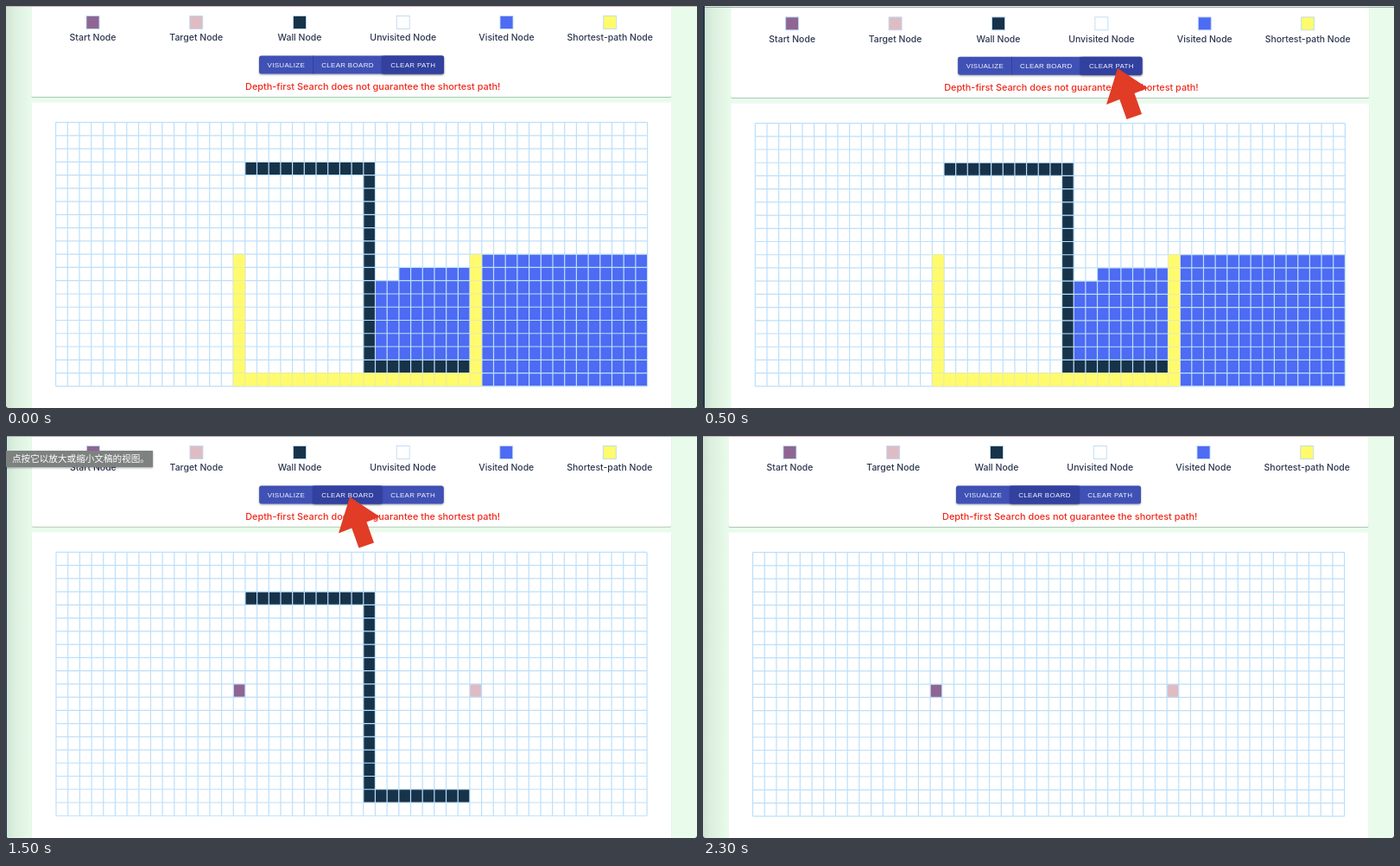
Write an HTML page that moves like this. It is 800 px wide and 465 px high and loops after 2.5 s.

```html
<!DOCTYPE html>
<html lang="en">
<head>
<meta charset="utf-8">
<title>Path finding board</title>
<style>
html, body { margin: 0; width: 100%; height: 100%; overflow: hidden; background: #e9fcec; }
svg { display: block; width: 800px; height: 465px; }
text { text-anchor: middle; }
.label { font: 500 10.5px Inter, sans-serif; fill: #2c3650; }
.note { font: 500 10.9px Inter, sans-serif; fill: #f0291c; }
.button { font: 8px "Liberation Sans", Arial, sans-serif; letter-spacing: .3px; fill: #f4f5fc; }
.tip { font: 500 10.6px "Noto Sans CJK SC", "Noto Sans CJK", sans-serif; fill: #fff; text-anchor: start; }
</style>
</head>
<body>
<svg id="stage" viewBox="0 0 800 465">
  <defs>
    <linearGradient id="shade">
      <stop offset="0" stop-color="#52695a" stop-opacity=".2"/>
      <stop offset=".4" stop-color="#52695a" stop-opacity=".08"/>
      <stop offset="1" stop-color="#52695a" stop-opacity="0"/>
    </linearGradient>
    <filter id="soft" x="-20%" y="-40%" width="140%" height="200%">
      <feDropShadow dx="0" dy="1" stdDeviation="1.1" flood-color="#000" flood-opacity=".35"/>
    </filter>
    <filter id="card" x="-5%" y="-5%" width="110%" height="112%">
      <feDropShadow dx="0" dy=".7" stdDeviation=".6" flood-color="#20402a" flood-opacity=".42"/>
    </filter>
  </defs>
  <rect width="800" height="465" fill="#e9fcec"/>
  <g id="page"></g>
  <g id="edges"></g>
  <path id="arrow" fill="#e03c26" d="M0 0L35 23L19.5 29L28 53L10.5 59L2.3 36L-13 42Z"/>
  <g id="tip">
    <rect x="-4" y="17" width="174" height="19" fill="#7d8281" filter="url(#soft)"/>
    <text class="tip" x="7" y="30">点按它以放大或缩小文稿的视图。</text>
  </g>
</svg>
<script>
const NS = 'http://www.w3.org/2000/svg';
const $ = id => document.getElementById(id);
const COLS = 50, ROWS = 20, LEFT = 57.6, TOP = 134.6, CW = 13.7, CH = 15.26;
const C = {
  start: '#8f6593', target: '#dfbcc4', wall: '#17334a',
  empty: '#ffffff', visited: '#4d6bf3', path: '#fffb6c'
};

function add(parent, tag, attrs, text) {
  const el = document.createElementNS(NS, tag);
  for (const k in attrs) el.setAttribute(k, attrs[k]);
  if (text) el.textContent = text;
  return parent.appendChild(el);
}

const rect = (parent, x, y, width, height, fill, more) =>
  add(parent, 'rect', { x, y, width, height, fill, ...more });

// Rectangular block of cells, inclusive of both corners
const block = (parent, c0, r0, c1, r1, fill) =>
  rect(parent, LEFT + c0 * CW, TOP + r0 * CH, (c1 - c0 + 1) * CW, (r1 - r0 + 1) * CH, fill);

const page = $('page');
rect(page, -4, 0, 34, 465, 'url(#shade)');
rect(page, 29.3, -10, 741.4, 115, '#fff', { rx: 2, filter: 'url(#card)' });
rect(page, 29.3, 111.5, 741.4, 400, '#fff', { rx: 2, filter: 'url(#card)' });

// Legend
[
  ['Start Node', C.start], ['Target Node', C.target], ['Wall Node', C.wall],
  ['Unvisited Node', C.empty], ['Visited Node', C.visited], ['Shortest-path Node', C.path]
].forEach(([name, fill], i) => {
  const x = 100.5 + i * 119.75;
  rect(page, x - 7.5, 11.5, 15, 15, fill, { stroke: '#bcdaf4', 'stroke-width': .9 });
  add(page, 'text', { class: 'label', x, y: 40.3 }, name);
});

// Buttons
rect(page, 293, 57.5, 214, 21, '#3f51b5', { rx: 2.5, filter: 'url(#soft)' });
const buttons = [
  ['VISUALIZE', 293, 355.5], ['CLEAR BOARD', 355.5, 435.3], ['CLEAR PATH', 435.3, 507]
].map(([name, x0, x1], i) => {
  const hover = rect(page, x0, 57.5, x1 - x0, 21, '#303f9f', { rx: 2, filter: 'url(#soft)' });
  if (i) rect(page, x0 - .4, 57.5, .8, 21, '#303f9f');
  add(page, 'text', { class: 'button', x: (x0 + x1) / 2 + .1, y: 71 }, name);
  return hover;
});
add(page, 'text', { class: 'note', x: 424.7, y: 97.4 },
  'Depth-first Search does not guarantee the shortest path!');

// Board
const walls = add(page, 'g');
block(walls, 16, 3, 26, 3, C.wall);
block(walls, 26, 4, 26, 18, C.wall);
block(walls, 27, 18, 34, 18, C.wall);

const visited = add(page, 'g');
block(visited, 27, 12, 34, 17, C.visited);
block(visited, 29, 11, 34, 11, C.visited);
block(visited, 36, 10, 49, 19, C.visited);

const ends = add(page, 'g');
block(ends, 15, 10, 15, 10, C.start);
block(ends, 35, 10, 35, 10, C.target);

let lines = '';
for (let c = 0; c <= COLS; c++) lines += `M${LEFT + c * CW} ${TOP}v${ROWS * CH}`;
for (let r = 0; r <= ROWS; r++) lines += `M${LEFT} ${TOP + r * CH}h${COLS * CW}`;
add(page, 'path', { d: lines, stroke: '#bddffa', 'stroke-width': 1.2, fill: 'none' });

const path = add(page, 'g', { stroke: '#e6ebb4', 'stroke-width': .8 });
for (let r = 10; r < 19; r++) {
  block(path, 15, r, 15, r, C.path);
  block(path, 35, r, 35, r, C.path);
}
for (let c = 15; c <= 35; c++) block(path, c, 19, c, 19, C.path);

// Window edges
const edges = $('edges');
const topEdge = rect(edges, 0, 0, 800, 1, '#cdb4b8');
const leftEdge = rect(edges, 0, 0, 1, 465, '#1d3b4c');
add(edges, 'path', { d: 'M0 462.5Q.5 464.5 2.5 465H0ZM800 462.5Q799.5 464.5 797.5 465H800Z', fill: '#24404c' });

// view: [x, y, scale] of the page; edge: [top y, top colour, left width]
const rest = [0, 0, 1], plain = [0, '#cdb4b8', 0];
const steps = [
  { view: rest, edge: plain, hover: 2, walls: 1, trail: 1 },
  { view: [3, 1.4, .997], edge: [.8, '#8b999b', 2], hover: 2, walls: 1, trail: 1, arrow: [480, 72] },
  { view: rest, edge: plain, hover: -1, walls: 1 },
  { view: [.5, 0, .9987], edge: [0, '#a9b4b3', 1], hover: 1, walls: 1, arrow: [398, 70.5], tip: 1 },
  { view: rest, edge: plain, hover: 1 }
];
const STEP = 500;
const show = (el, on) => el.setAttribute('display', on ? 'inline' : 'none');

function draw(ms) {
  const s = steps[Math.floor(ms / STEP) % steps.length];
  const [x, y, k] = s.view;
  page.setAttribute('transform', `translate(${x} ${y}) scale(${k})`);
  topEdge.setAttribute('y', s.edge[0]);
  topEdge.setAttribute('fill', s.edge[1]);
  leftEdge.setAttribute('width', s.edge[2]);
  buttons.forEach((b, i) => show(b, i === s.hover));
  show(walls, s.walls);
  show(visited, s.trail);
  show(path, s.trail);
  show(ends, !s.trail);
  show($('tip'), s.tip);
  show($('arrow'), s.arrow);
  if (s.arrow) $('arrow').setAttribute('transform', `translate(${s.arrow})`);
}

const began = performance.now();
function tick() {
  draw(performance.now() - began);
  requestAnimationFrame(tick);
}
tick();
</script>
</body>
</html>
```
